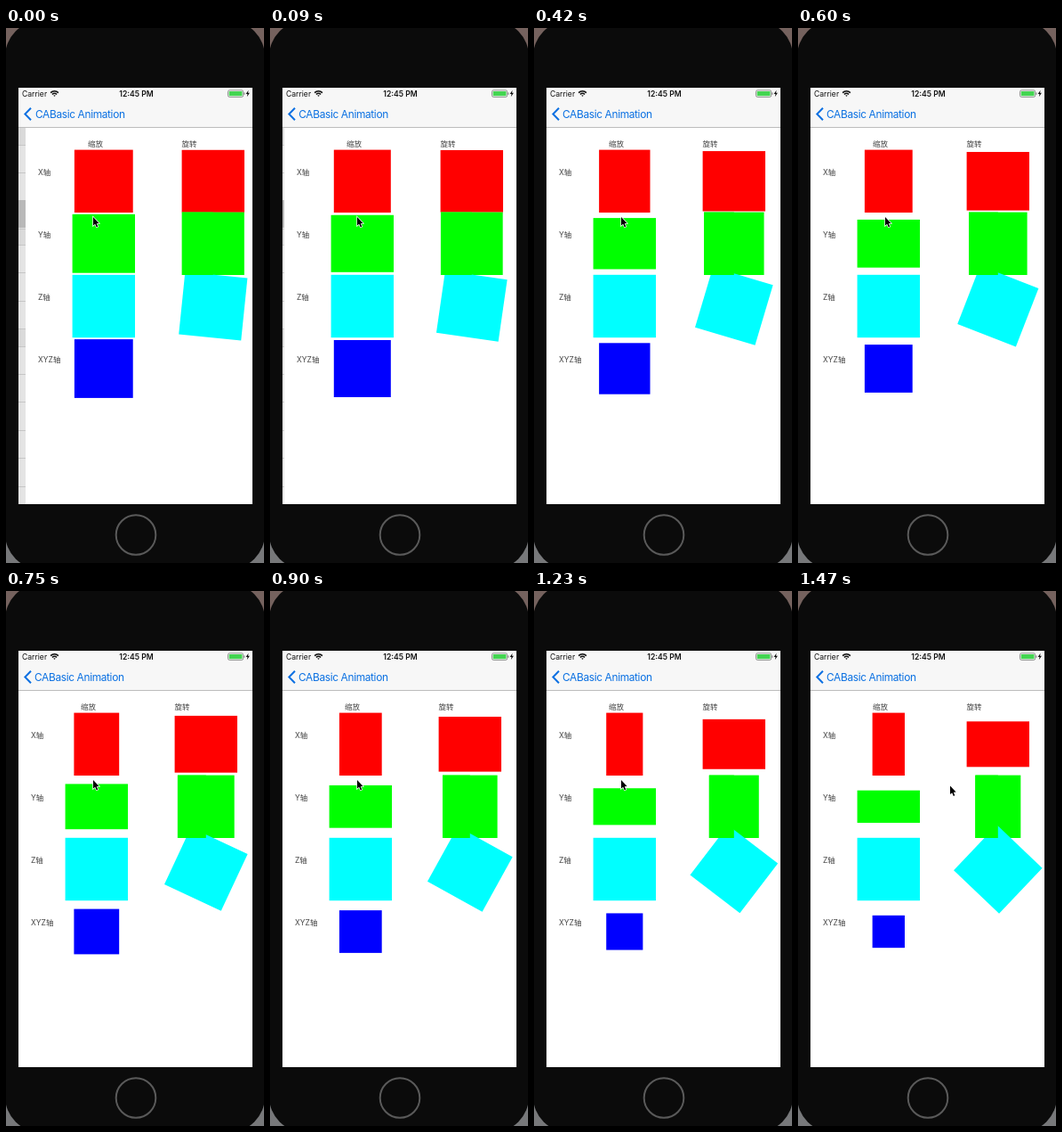
Animation, 290 px wide and 600 px high, one loop 1.5 s. Source, as an HTML page with a canvas:

```html
<!DOCTYPE html>
<html lang="zh">
<head>
<meta charset="utf-8">
<style>
  html, body { margin: 0; width: 290px; height: 600px; overflow: hidden; }
  canvas { display: block; }
</style>
</head>
<body>
<canvas id="stage" width="290" height="600"></canvas>
<script>
const ctx = document.getElementById('stage').getContext('2d');
const LOOP = 1500, STEP = 30, SIZE = 70.4;
const RED = '#f00', GREEN = '#0f0', CYAN = '#0ff', BLUE = '#0000ff', TINT = '#0a70e2';
const SANS = 'Inter, "Noto Sans CJK SC", "Noto Sans CJK", sans-serif';

function rect(x, y, w, h, color) {
  ctx.fillStyle = color;
  ctx.fillRect(x, y, w, h);
}

function box(cx, cy, sx, sy, color) {
  const w = SIZE * sx, h = SIZE * sy;
  rect(cx - w / 2, cy - h / 2, w, h, color);
}

function text(str, x, y, size, color, weight = 400, align = 'left', spacing = 0) {
  ctx.font = `${weight} ${size}px ${SANS}`;
  ctx.fillStyle = color;
  ctx.textAlign = align;
  ctx.letterSpacing = spacing + 'px';
  ctx.fillText(str, x, y);
}

function shape(points, fill, stroke, width) {
  ctx.beginPath();
  points.forEach(([x, y]) => ctx.lineTo(x, y));
  if (fill) { ctx.closePath(); ctx.fillStyle = fill; }
  if (stroke) { ctx.strokeStyle = stroke; ctx.lineWidth = width; ctx.stroke(); }
  if (fill) ctx.fill();
}

function phone() {
  rect(0, 0, 290, 600, '#75625e');
  rect(0, 300, 290, 300, '#77787a');
  ctx.beginPath();
  ctx.roundRect(-1, -8, 292, 615, 40);
  ctx.fillStyle = '#0b0b0b';
  ctx.fill();
  ctx.beginPath();
  ctx.arc(146, 568.5, 22.3, 0, 7);
  ctx.strokeStyle = '#5a5a5a';
  ctx.lineWidth = 2;
  ctx.stroke();
  rect(14, 67, 263, 467, '#fff');
}

function statusBar() {
  text('Carrier', 18, 77, 8.6, '#111');
  text('12:45 PM', 146.5, 77, 8.6, '#111', 600, 'center');
  ctx.strokeStyle = '#111';
  for (const r of [1, 3.6, 6.2]) {
    ctx.beginPath();
    ctx.arc(54.5, 77, r, -Math.PI * .75, -Math.PI * .25);
    ctx.lineWidth = 1.6;
    ctx.stroke();
  }
  ctx.beginPath();
  ctx.roundRect(249.5, 69.8, 17.2, 7.6, 1.8);
  ctx.strokeStyle = '#777';
  ctx.lineWidth = .8;
  ctx.stroke();
  rect(250.7, 71, 14.8, 5.2, '#43d551');
  rect(267.4, 72.4, 1, 2.4, '#777');
  shape([[272.6, 69.8], [269.6, 74], [271.5, 74], [270.8, 77.2], [273.9, 72.8], [272, 72.8]], '#111');
}

function navBar(slide) {
  rect(14, 67, 263, 44, '#f7f7f7');
  rect(14, 111, 263, 1, '#bdbdbd');
  statusBar();
  shape([[28, 89.8], [21.4, 96.5], [28, 103.2]], null, TINT, 2);
  text('CABasic Animation', 32 + slide / 8, 100.7, 11.9, TINT, 400, 'left', -.35);
}

// Dimmed edge of the list that the new page slides over
function listEdge(width) {
  rect(14, 112, width, 422, '#e4e4e4');
  for (const top of [112, 224.5, 338]) rect(14, top, width, 19, '#dadada');
  for (const top of [131, 243.5, 357])
    for (let row = 0; row < (top > 300 ? 6 : 4); row++)
      rect(14, Math.round(top + row * 31.4 - .5), width, 1, '#c6c6c6');
  rect(14, 193, width, 31, '#b9b9b9');
}

function page(slide, progress) {
  const scale = 1 - progress / 2, angle = progress * Math.PI / 4, squash = Math.cos(angle);
  ctx.save();
  ctx.beginPath();
  ctx.rect(14, 112, 263, 422);
  ctx.clip();
  listEdge(slide);
  ctx.translate(slide, 0);
  rect(14, 112, 263, 422, '#fff');

  text('缩放', 84, 133, 8.5, '#444');
  text('旋转', 189.5, 133, 8.5, '#444');
  ['X轴', 'Y轴', 'Z轴', 'XYZ轴'].forEach((s, i) => text(s, 28, 164.6 + 70 * i, 8.5, '#444'));

  box(101.8, 171.8, scale, 1, RED);
  box(101.8, 241.8, 1, scale, GREEN);
  box(101.8, 312, 1, 1, CYAN);
  box(101.8, 382, scale, scale, BLUE);

  box(224.8, 171.8, 1, squash, RED);
  box(224.8, 241.8, squash, 1, GREEN);
  ctx.save();
  ctx.translate(224.8, 312);
  ctx.rotate(angle);
  box(0, 0, 1, 1, CYAN);
  ctx.restore();
  // The left half of the tilted green layer is nearer than the cyan one
  const half = SIZE * squash / 2;
  rect(224.8 - half, 241.8 - SIZE / 2, half, SIZE, GREEN);
  ctx.restore();
}

function cursor(t) {
  const k = Math.min(1, Math.max(0, (t - 1260) / 210));
  ctx.save();
  ctx.translate(98 + 73 * k, 212 + 6.5 * k);
  shape([[0, 0], [0, 9.6], [2.2, 7.7], [3.8, 11.4], [5.3, 10.7], [3.8, 7.2], [6.6, 7]], '#000', '#fff', 1.4);
  ctx.restore();
}

function draw(now) {
  const t = Math.floor(now % LOOP / STEP) * STEP;
  const slide = 8 * Math.exp(-t / 65);
  phone();
  page(slide, .13 + t * .00057);
  navBar(slide);
  cursor(t);
}

function tick() {
  draw(performance.now());
  requestAnimationFrame(tick);
}
tick();
</script>
</body>
</html>
```
